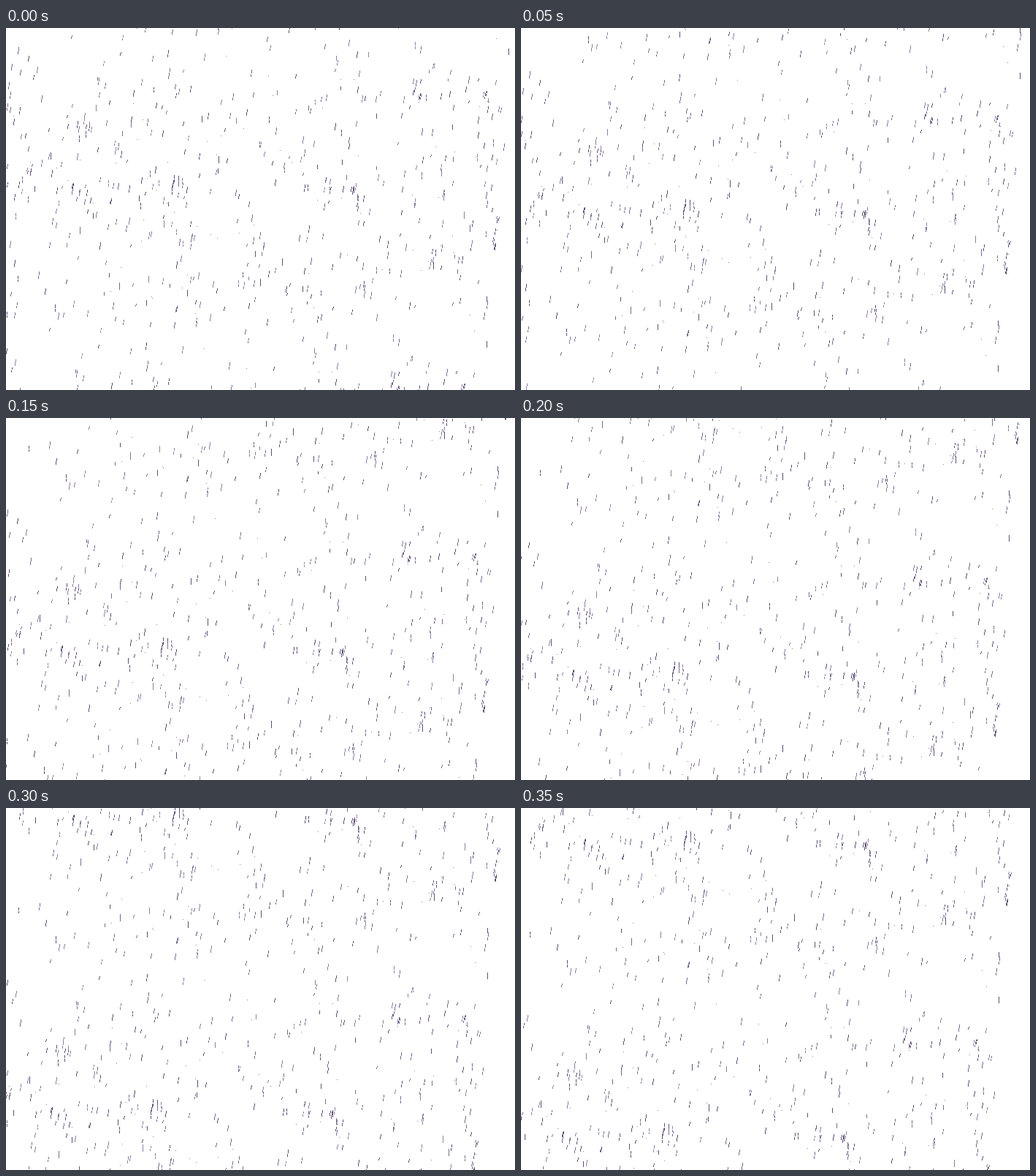
Animation of 697x495 px, one loop 400 ms. Source, as an HTML page with a canvas:

```html
<!DOCTYPE html>
<html lang="en">
<head>
<meta charset="utf-8">
<title>Rain</title>
<style>
html, body { margin: 0; width: 100%; height: 100%; overflow: hidden; background: #fff; }
canvas { display: block; }
</style>
</head>
<body>
<canvas id="stage" width="697" height="495"></canvas>
<script>
const W = 697, H = 495;
const STEP = 50, STEPS = 8;
const FALL = 32.9, WIND = -4.9;    // pixels per step
const TILE = 400, DRIFT = -30;     // the field repeats every TILE down, DRIFT across
const COLORS = ['#5f5074', '#7b6b90', '#8f80a2'];
const ctx = document.getElementById('stage').getContext('2d');

// Denser patches: centre and half size
const patches = [
  { x: 32, y: 180, w: 4, h: 18 },
  { x: 106, y: 237, w: 11, h: 14 },
  { x: 238, y: 219, w: 15, h: 13 },
  { x: 439, y: 220, w: 5, h: 20 },
  { x: 480, y: 236, w: 11, h: 18 },
  { x: 567, y: 85, w: 11, h: 28 },
  { x: 656, y: 98, w: 7, h: 11 },
  { x: 669, y: 272, w: 4, h: 28 },
  { x: 581, y: 318, w: 4, h: 20 }
];

let seed = 2041;
function rnd() {
  seed = (seed + 0x6D2B79F5) | 0;
  let t = Math.imul(seed ^ (seed >>> 15), 1 | seed);
  t = (t + Math.imul(t ^ (t >>> 7), 61 | t)) ^ t;
  return ((t ^ (t >>> 14)) >>> 0) / 4294967296;
}

const pick = list => list[Math.floor(rnd() * list.length)];
const around = (c, r) => c + (rnd() * 2 - 1) * r;

function makeDrop(x, y) {
  const kind = rnd();
  const len = kind < 0.12 ? 1 : kind < 0.3 ? 4 + Math.floor(rnd() * 3) : 7 + Math.floor(rnd() * 4);
  return {
    x: Math.round(x),
    y: Math.round(y),
    len,
    lean: len > 3 && rnd() < 0.8 ? 1 : 0,
    gap: len > 6 && rnd() < 0.5 ? 1 : 0,
    color: len === 1 ? COLORS[2] : pick(COLORS)
  };
}

const drops = [];
for (const p of patches) {
  for (let i = 0; i < 7; i++) drops.push(makeDrop(around(p.x, p.w), around(p.y, p.h)));
}
for (let i = 0; i < 530; i++) {
  const y = rnd() * TILE;
  const x = rnd() * (695 + y * DRIFT / TILE);
  // The top of the field is thinner
  if (y > 65 || rnd() < 0.5) drops.push(makeDrop(x, y));
}

// A drop is two thin vertical runs, the upper one a pixel to the right
function drawDrop(d, dx, dy) {
  const x = d.x + dx, half = d.len >> 1, top = d.y + dy - half;
  if (top > H || top + d.len < 0) return;
  ctx.fillStyle = d.color;
  ctx.fillRect(x + d.lean, top, 1, half);
  ctx.fillRect(x, top + half + d.gap, 1, d.len - half - d.gap);
}

function draw(step) {
  ctx.fillStyle = '#fff';
  ctx.fillRect(0, 0, W, H);
  for (let k = -1; k <= 1; k++) {
    const dx = Math.round(WIND * step) + DRIFT * k;
    const dy = Math.round(FALL * step) + TILE * k;
    for (const d of drops) {
      // Drops that drifted out on the left do not come back
      if (k < 0 && d.x < 16) continue;
      drawDrop(d, dx, dy);
    }
  }
}

let start = null, shown = 0;
function tick(now) {
  if (start === null) start = now;
  const step = Math.floor((now - start) / STEP) % STEPS;
  if (step !== shown) draw(shown = step);
  requestAnimationFrame(tick);
}
draw(0);
requestAnimationFrame(tick);
</script>
</body>
</html>
```
